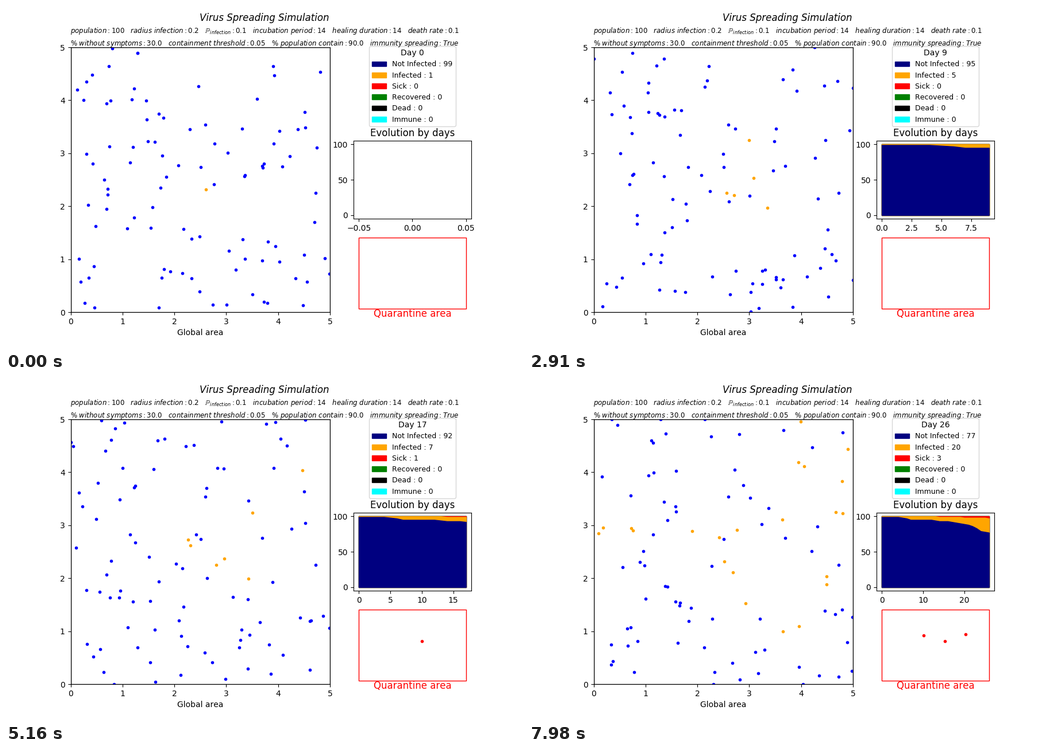
Write a matplotlib script that moves like this. It is 900 px wide and 600 px high and loops after 8000 ms.

```python
import numpy as np
import matplotlib.pyplot as plt
from matplotlib.animation import FuncAnimation
from matplotlib.patches import Patch, Rectangle

plt.rcParams["text.kerning_factor"] = 6

W, H = 900, 600
FRAMES, INTERVAL = 250, 32
STEP_MS, STEPS, STEPS_PER_DAY = 30, 267, 10
PEOPLE, SIZE = 100, 5

STATES = [("Not Infected", "navy"), ("Infected", "orange"), ("Sick", "red"),
          ("Recovered", "green"), ("Dead", "black"), ("Immune", "cyan")]

# The first carrier, then the people who never leave their place
PATIENT_ZERO = (2.61, 2.32)
STILL = [(2.51, 2.74), (2.6, 3.54), (3.7, 2.76), (4.72, 2.25), (1.15, 2.82)]
BEDS = np.array([(0.589, 0.557), (0.783, 0.654), (0.391, 0.638)])

# Turning points of the epidemic: day and number of people ever infected
CURVE = np.array([(0, 1), (4, 1), (6, 3), (7, 5), (12, 5), (14, 7), (16, 7),
                  (21, 12), (23, 17), (24, 21), (26, 23), (27, 26)])


def ever_infected(day):
    return int(np.interp(day, *CURVE.T) + 1e-6)


def isolated(day):
    """The first case falls sick on day 14, then one more every six days."""
    return max(0, (day - 8) // 6)


def counts(day):
    ever, sick = ever_infected(day), isolated(day)
    return [PEOPLE - ever, ever - sick, sick, 0, 0, 0]


def walk(rng):
    """Random walk with one straight leg a day, stopped by the walls."""
    rest = PEOPLE - 1 - len(STILL)
    spots = np.vstack([[PATIENT_ZERO], STILL, rng.uniform(0, SIZE, (rest, 2))])
    stride = np.concatenate([[0.08], np.zeros(len(STILL)),
                             rng.uniform(0.01, 0.4, rest)])
    knots = [spots]
    for _ in range(STEPS // STEPS_PER_DAY + 1):
        leg = rng.normal(0, 1, (PEOPLE, 2)) * stride[:, None]
        knots.append(np.clip(knots[-1] + leg, 0, SIZE))
    knots = np.array(knots)
    day, part = np.divmod(np.arange(STEPS), STEPS_PER_DAY)
    part = part[:, None, None] / STEPS_PER_DAY
    return knots[day] * (1 - part) + knots[day + 1] * part


def spread(paths):
    """Order of infection: the virus always jumps to the nearest neighbour."""
    order = [0]
    healthy = list(range(1 + len(STILL), PEOPLE))
    for step, spots in enumerate(paths):
        day = (step + 2) / STEPS_PER_DAY
        while len(order) < ever_infected(day):
            active = spots[order[isolated(int(day)):]]
            gaps = spots[healthy][:, None] - active[None]
            nearest = np.hypot(*gaps.T).min(axis=0).argmin()
            order.append(healthy.pop(nearest))
    return order


def math_line(*parts):
    return "$" + r"\quad ".join(p.replace(" ", r"\ ") for p in parts) + "$"


paths = walk(np.random.default_rng(11))
order = spread(paths)
history = np.array([counts(d) for d in range(STEPS // STEPS_PER_DAY + 2)]).T
stacked = history.cumsum(axis=0)

fig = plt.figure(figsize=(W / 100, H / 100), dpi=100, facecolor="white")
area = plt.subplot2grid((3, 3), (0, 0), rowspan=3, colspan=2)
info = plt.subplot2grid((3, 3), (0, 2))
chart = plt.subplot2grid((3, 3), (1, 2))
ward = plt.subplot2grid((3, 3), (2, 2))

fig.suptitle("Virus Spreading Simulation", style="italic", fontsize=12)
settings = [
    math_line("population:100", "radius infection:0.2",
              r"\mathbb{P}_{infection}:0.1", "incubation period:14",
              "healing duration:14", "death rate:0.1"),
    math_line(r"\% without symptoms:30.0", "containment threshold:0.05",
              r"\% population contain:90.0", "immunity spreading:True"),
]
for row, line in enumerate(settings):
    fig.text(0.5, 1 - (47 + 22 * row) / H, line, fontsize=8.43, ha="center")

area.set(xlim=(0, SIZE), ylim=(0, SIZE), xlabel="Global area")
area.add_patch(Rectangle((0, 0), SIZE, SIZE, fill=False, edgecolor="black"))
healthy_dots, = area.plot([], [], ".", color="blue")
carrier_dots, = area.plot([], [], ".", color="orange")

info.axis("off")
legend = info.legend(handles=[Patch(color=c, label=n) for n, c in STATES],
                     loc="center", fontsize=9, title="Day 0", title_fontsize=10)

ward.axis("off")
ward.set(xlim=(-0.05, 1.05), ylim=(-0.05, 1.05))
ward.add_patch(Rectangle((0, 0), 1, 1, fill=False, edgecolor="red"))
patient_dots, = ward.plot([], [], ".", color="red")
fig.text(707.5 / W, 1 - 542 / H, "Quarantine area", color="red",
         fontsize=12, ha="center")

shown = {"day": None}


def show_day(day):
    legend.get_title().set_text(f"Day {day}")
    for text, (name, _), n in zip(legend.get_texts(), STATES, history[:, day]):
        text.set_text(f"{name} : {n}")
    chart.clear()
    chart.set_title("Evolution by days")
    if day:
        # Tallest band first, so each one covers the foot of the last
        for (_, color), top in reversed(list(zip(STATES, stacked))):
            chart.fill_between(range(day + 1), top[:day + 1], color=color)
    pad = 0.05 * day or 0.055
    chart.set(xlim=(-pad, day + pad), ylim=(-5, 105), yticks=[0, 50, 100])
    shown["day"] = day


def update(frame):
    step = min(int((frame + 0.5) * INTERVAL / STEP_MS), STEPS - 1)
    time = (step + 2) / STEPS_PER_DAY
    day = int(time)
    if day != shown["day"]:
        show_day(day)
    caught, gone = order[:ever_infected(time)], isolated(day)
    spots = paths[step]
    healthy_dots.set_data(*np.delete(spots, caught, axis=0).T)
    carrier_dots.set_data(*spots[caught[gone:]].T)
    patient_dots.set_data(*BEDS[:gone].T)
    return healthy_dots, carrier_dots, patient_dots


def reset():
    shown["day"] = None
    return update(0)


anim = FuncAnimation(fig, update, frames=FRAMES, interval=INTERVAL,
                     init_func=reset, repeat=True, repeat_delay=0, blit=False)
plt.show()
```
